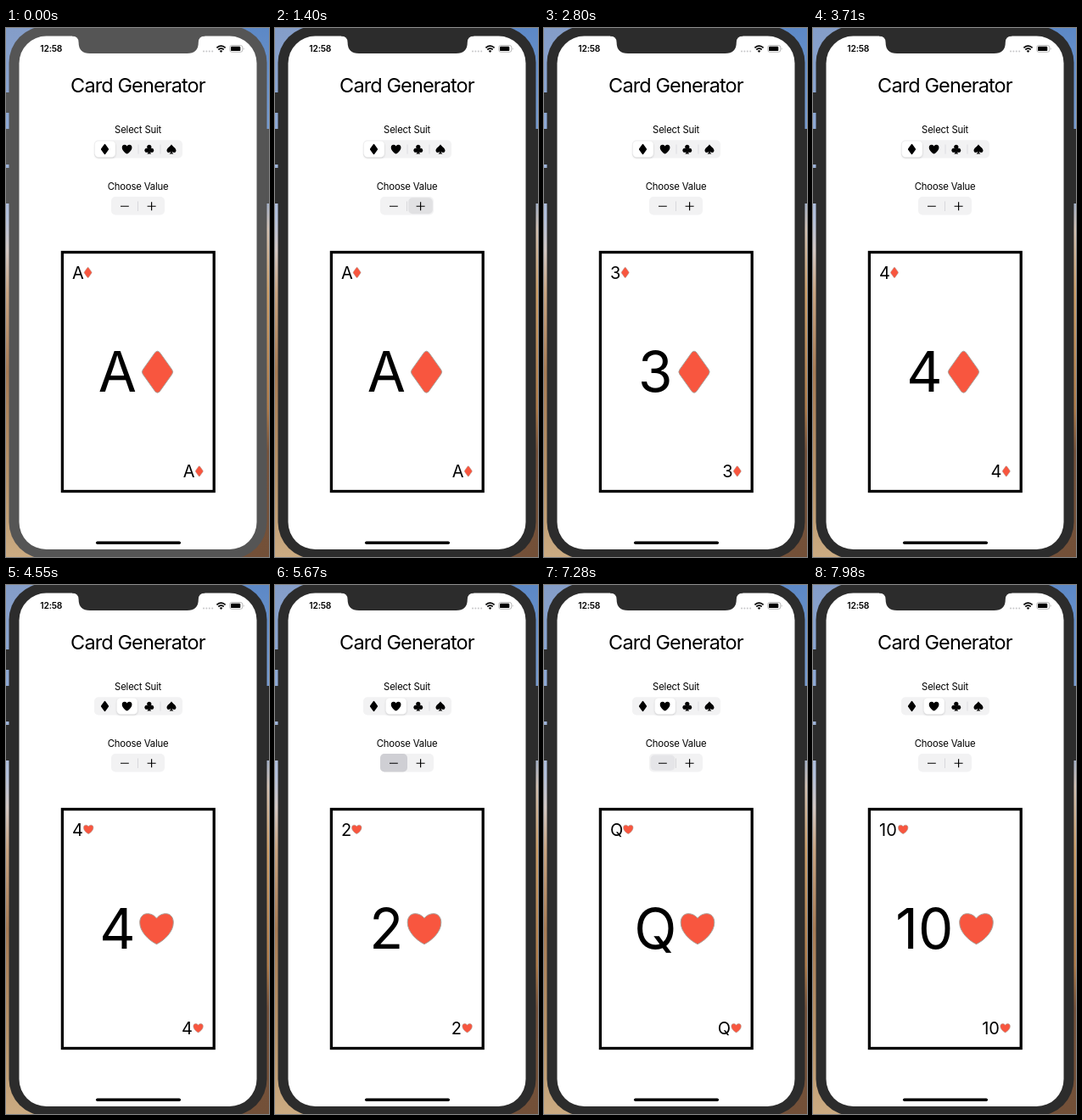
An HTML page for the animation above (8000 ms loop, 310 px wide and 624 px high).

```html
<!DOCTYPE html>
<html lang="en">
<head>
<meta charset="utf-8">
<title>Card Generator</title>
<style>
  html, body { margin: 0; width: 100%; height: 100%; overflow: hidden; background: #fff; }
  svg { display: block; width: 310px; height: 624px; }
  text { font-family: Inter, Roboto, "Liberation Sans", sans-serif; fill: #000; }
  .title { font-size: 23.5px; letter-spacing: -.038em; text-anchor: middle; }
  .label { font-size: 11.3px; letter-spacing: -.015em; text-anchor: middle; }
  .clock { font-size: 10.3px; font-weight: 600; letter-spacing: -.02em; }
  .big { font-size: 65.5px; text-anchor: middle; }
  .small { font-size: 20px; }
  .end { text-anchor: end; }
  .pip { fill: #f8563f; stroke: #a9a19a; }
</style>
</head>
<body>
<svg viewBox="0 0 310 624" xmlns="http://www.w3.org/2000/svg">
  <defs>
    <linearGradient id="desertLeft" x1="0" y1="0" x2="0" y2="1">
      <stop offset="0" stop-color="#849dc8"/>
      <stop offset=".2" stop-color="#8faad6"/>
      <stop offset=".36" stop-color="#b4c1dc"/>
      <stop offset=".42" stop-color="#d3c8c4"/>
      <stop offset=".5" stop-color="#c9a583"/>
      <stop offset=".65" stop-color="#a87c55"/>
      <stop offset=".85" stop-color="#b8946a"/>
      <stop offset="1" stop-color="#cbab82"/>
    </linearGradient>
    <linearGradient id="desertRight" x1="0" y1="0" x2="0" y2="1">
      <stop offset="0" stop-color="#5c88c6"/>
      <stop offset=".3" stop-color="#88a9d8"/>
      <stop offset=".38" stop-color="#d3c2b4"/>
      <stop offset=".5" stop-color="#cfa069"/>
      <stop offset=".72" stop-color="#b07c4a"/>
      <stop offset=".8" stop-color="#76523a"/>
      <stop offset="1" stop-color="#735038"/>
    </linearGradient>
    <filter id="lift" x="-30%" y="-30%" width="160%" height="170%">
      <feDropShadow dx="0" dy="1" stdDeviation="1.2" flood-opacity=".2"/>
    </filter>
    <!-- Suits are drawn around the origin, about 40 units tall -->
    <path id="diamond" d="M0-24.5Q2-24.5 3.5-22L17-3Q19.3 0 17 3L3.5 22Q2 24.5 0 24.5T-3.5 22L-17 3Q-19.3 0-17-3L-3.5-22Q-2-24.5 0-24.5Z"/>
    <path id="heart" d="M0-12.5C3-16.5 7-18 11-18C16.5-18 19.8-13.5 19.8-7.5C19.8 3 10 13 0 18C-10 13-19.8 3-19.8-7.5C-19.8-13.5-16.5-18-11-18C-7-18-3-16.5 0-12.5Z"/>
    <g id="club">
      <circle cy="-10" r="9.5"/><circle cx="-10.5" cy="4.5" r="9.5"/><circle cx="10.5" cy="4.5" r="9.5"/>
      <path d="M-3-5H3Q2 14 9 20H-9Q-2 14-3-5Z"/>
    </g>
    <path id="spade" d="M0-21C5-12 20-5 20 5C20 15 8 17 3 10Q3 16 9 20H-9Q-3 16-3 10C-8 17-20 15-20 5C-20-5-5-12 0-21Z"/>
  </defs>

  <rect width="155" height="624" fill="url(#desertLeft)"/>
  <rect x="155" width="155" height="624" fill="url(#desertRight)"/>
  <g id="bezel">
    <rect x="0" y="76" width="6" height="24"/>
    <rect x="0" y="119" width="6" height="42"/>
    <rect x="0" y="165" width="6" height="42"/>
    <rect x="304" y="119" width="6" height="88"/>
    <rect x="3.5" y="-2" width="304" height="628" rx="43"/>
  </g>
  <rect x="15.5" y="9.6" width="280" height="605.4" rx="32" fill="#fff"/>
  <path id="notch" d="M78 8V9.6Q85.6 10 85.6 17Q85.6 30 99 30H213.4Q226.8 30 226.8 17Q226.8 10 234.4 9.6V8Z"/>

  <text class="clock" x="40.3" y="28">12:58</text>
  <g fill="#c6c6c8">
    <circle cx="233" cy="27.5" r="1"/><circle cx="236.4" cy="27.5" r="1"/>
    <circle cx="239.8" cy="27.5" r="1"/><circle cx="243.2" cy="27.5" r="1"/>
  </g>
  <g fill="none" stroke="#000" stroke-width="1.7">
    <path d="M248.4 23.3Q253.5 18.9 258.6 23.3M250.3 25.5Q253.5 22.8 256.7 25.5"/>
  </g>
  <path d="M251.7 26.9Q253.5 25.6 255.3 26.9L253.5 28.9Z"/>
  <rect x="263.8" y="20.5" width="15" height="7.8" rx="2.3" fill="none" stroke="#a5a5a5" stroke-width=".8"/>
  <rect x="265" y="21.7" width="11.3" height="5.4" rx="1.2"/>
  <path d="M279.9 22.9Q281.4 24.4 279.9 25.9Z" fill="#a5a5a5"/>

  <text class="title" x="155.4" y="76">Card Generator</text>
  <text class="label" x="155.6" y="124">Select Suit</text>
  <text class="label" x="155.6" y="191">Choose Value</text>

  <rect x="104" y="132.3" width="104" height="21.2" rx="5" fill="#f2f2f3"/>
  <g id="dividers" fill="#d8d8db"></g>
  <rect id="thumb" y="133.6" width="24" height="18.6" rx="4.2" fill="#fff" filter="url(#lift)"/>
  <use href="#diamond" transform="translate(116.5 143) scale(.255)"/>
  <use href="#heart" transform="translate(142.6 143.1) scale(.295)"/>
  <use href="#club" transform="translate(168.8 143) scale(.27)"/>
  <use href="#spade" transform="translate(195 143) scale(.275)"/>

  <rect x="124" y="199" width="63" height="21.4" rx="5" fill="#f2f2f3"/>
  <rect x="155.1" y="204.5" width=".9" height="11.5" fill="#d5d5d8"/>
  <g fill="#cfcfd4">
    <rect id="minusGlow" y="199" height="21.4" rx="5"/>
    <rect id="plusGlow" y="199" height="21.4" rx="5"/>
  </g>
  <path d="M135 210.2H144.8M166.6 210.2H176.6M171.6 205.2V215.2" stroke="#000" stroke-width="1.15"/>

  <rect x="66.4" y="264.5" width="178.8" height="282" fill="#fff" stroke="#000" stroke-width="3.3"/>
  <text class="small rank" x="78" y="296"></text>
  <text class="big rank" x="131.3" y="429"></text>
  <text class="small end rank" id="lastRank" y="530"></text>
  <use class="pip" id="topPip" stroke-width="2"/>
  <use class="pip" id="midPip" stroke-width="1"/>
  <use class="pip" id="lastPip" stroke-width="2"/>

  <rect x="106" y="605.6" width="100" height="3.4" rx="1.7"/>
</svg>

<script>
const LOOP = 8000;
const $ = id => document.getElementById(id);
const clamp = v => Math.max(0, Math.min(1, v));
const ramp = (t, from, to) => clamp((t - from) / (to - from));
const ease = p => p * p * (3 - 2 * p);

const RANKS = ["A", "2", "3", "4", "5", "6", "7", "8", "9", "10", "J", "Q", "K"];
// Advance of each rank at the large size; the suit follows it
const ADVANCE = { A: 46, 2: 41, 3: 43, 4: 44, 10: 74, J: 37, Q: 51, K: 45 };
const SUITS = {
  diamond: { small: .25, topGap: 5.3, lastX: 227.8, rankEnd: 222.5 },
  heart: { small: .29, topGap: 6.5, lastX: 226.6, rankEnd: 220 }
};
const PLUS = [1330, 2100, 2940];
const MINUS = Array.from({ length: 7 }, (_, i) => 5180 + 420 * i);
const SUIT_CHANGE = 4200;

const countSince = (presses, delay, t) => presses.filter(s => t >= s + delay).length;

// A press highlight grows to the button's edges as it fades in, then fades out in place
function glow(id, presses, t, x, width, rise, hold, end) {
  const age = Math.min(...presses.filter(s => t >= s - 30).map(s => t - s));
  const grown = ramp(age, -30, rise);
  const inset = 2.4 * (1 - grown);
  const el = $(id);
  el.setAttribute("x", x + inset);
  el.setAttribute("y", 199 + inset);
  el.setAttribute("width", width - 2 * inset);
  el.setAttribute("height", 21.4 - 2 * inset);
  el.setAttribute("opacity", age < end ? Math.min(grown, 1 - ramp(age, hold, end)) : 0);
}

const dividers = [130, 156, 182].map(x => {
  const bar = document.createElementNS("http://www.w3.org/2000/svg", "rect");
  for (const [k, v] of Object.entries({ x: x - .4, y: 137.5, width: .8, height: 11 })) bar.setAttribute(k, v);
  $("dividers").append(bar);
  return { x, bar };
});
const rankTexts = document.querySelectorAll(".rank");

function placePip(id, suit, x, y, scale) {
  $(id).setAttribute("href", "#" + suit);
  $(id).setAttribute("transform", `translate(${x} ${y}) scale(${scale})`);
}

function draw(t) {
  const grey = Math.round(85 - 41 * ramp(t, 0, 350));
  $("bezel").setAttribute("fill", `rgb(${grey},${grey},${grey})`);
  $("notch").setAttribute("fill", `rgb(${grey},${grey},${grey})`);

  const thumbX = 104.8 + 26 * ease(ramp(t, SUIT_CHANGE, SUIT_CHANGE + 280));
  $("thumb").setAttribute("x", thumbX);
  for (const { x, bar } of dividers)
    bar.setAttribute("opacity", clamp((Math.abs(thumbX + 12 - x) - 14) / 10));

  glow("plusGlow", PLUS, t, 156, 31, 170, 250, 420);
  glow("minusGlow", MINUS, t, 124, 32, 60, 180, 280);

  const index = countSince(PLUS, 140, t) - countSince(MINUS, 70, t);
  const rank = RANKS[(index + RANKS.length) % RANKS.length];
  const suit = t < SUIT_CHANGE + 70 ? "diamond" : "heart";
  const look = SUITS[suit];
  const advance = ADVANCE[rank];

  rankTexts.forEach(el => { el.textContent = rank; });
  $("lastRank").setAttribute("x", look.rankEnd);
  placePip("topPip", suit, 77.5 + advance * .3 + look.topGap, 288.4, look.small);
  placePip("midPip", suit, 155.5 + advance / 2, 405.7, 1);
  placePip("lastPip", suit, look.lastX, 522.8, look.small);
}

const start = performance.now();
function tick() {
  draw((performance.now() - start) % LOOP);
  requestAnimationFrame(tick);
}
tick();
</script>
</body>
</html>
```
